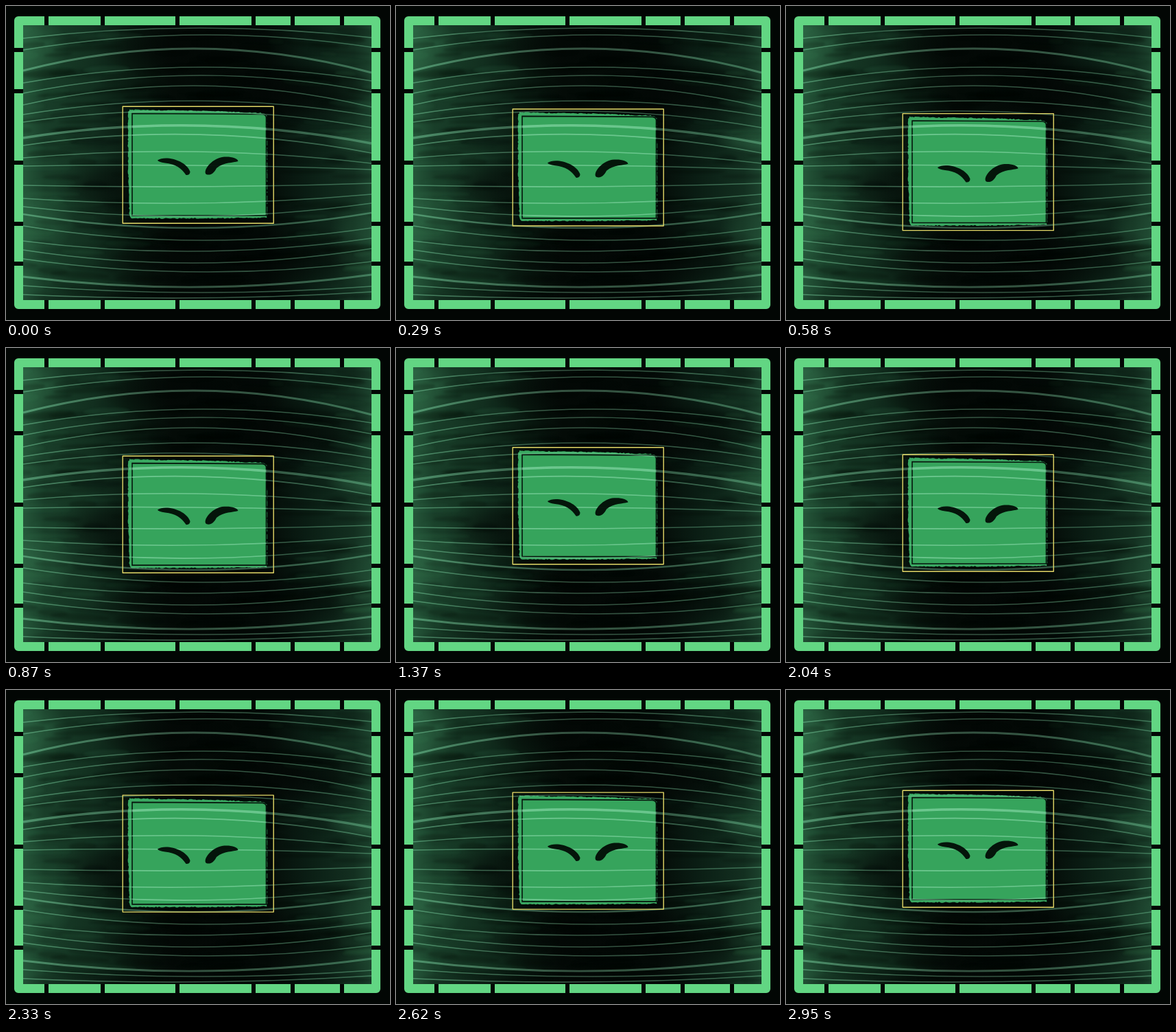
Animation of 560 by 457 pixels, one loop 3000 ms. Source, as an HTML page with a canvas:

```html
<!DOCTYPE html>
<html>
<head>
<meta charset="utf-8">
<style>
html, body { margin: 0; width: 100%; height: 100%; overflow: hidden; background: #020604; }
canvas { display: block; }
</style>
</head>
<body>
<canvas id="stage" width="560" height="457"></canvas>
<script>
const W = 560, H = 457;
const ctx = document.getElementById('stage').getContext('2d');

let seed = 11;
const rnd = () => (seed = (seed * 16807) % 2147483647) / 2147483647;
const between = (a, b) => a + (b - a) * rnd();

function layer(draw) {
  const c = document.createElement('canvas');
  c.width = W; c.height = H;
  draw(c.getContext('2d'));
  return c;
}

function blob(g, x, y, rx, ry, rgb, alpha) {
  g.save();
  g.translate(x, y);
  g.scale(rx, ry);
  const fade = g.createRadialGradient(0, 0, 0, 0, 0, 1);
  fade.addColorStop(0, `rgba(${rgb},${alpha})`);
  fade.addColorStop(0.5, `rgba(${rgb},${alpha * 0.7})`);
  fade.addColorStop(1, `rgba(${rgb},0)`);
  g.fillStyle = fade;
  g.fillRect(-1, -1, 2, 2);
  g.restore();
}

const INK = '2,6,4', MOSS = '58,128,86';

const backdrop = layer(g => {
  g.fillStyle = '#020604';
  g.fillRect(0, 0, W, H);
  g.save();
  g.beginPath();
  g.rect(24, 27, 510, 402);
  g.clip();
  const side = g.createLinearGradient(25, 0, 533, 0);
  [[0, '#25573a'], [.06, '#193e29'], [.2, '#122f1f'], [.3, '#0a1c12'], [.43, '#040b07'],
   [.7, '#040c08'], [.83, '#0b1f15'], [.95, '#132f20'], [1, '#1c422d']]
    .forEach(([p, c]) => side.addColorStop(p, c));
  g.fillStyle = side;
  g.fillRect(0, 0, W, H);
  blob(g, 30, 60, 60, 55, MOSS, .4);
  blob(g, 40, 315, 60, 50, MOSS, .35);
  blob(g, 525, 195, 60, 20, MOSS, .4);
  blob(g, 515, 345, 45, 70, MOSS, .2);
  blob(g, 280, 60, 150, 45, INK, .7);
  blob(g, 410, 125, 140, 50, INK, .8);
  blob(g, 160, 265, 90, 45, INK, .55);
  blob(g, 340, 365, 220, 55, INK, .75);
  blob(g, 280, 430, 290, 28, INK, .7);

  // Streaks of dry paint that follow the bulge of the scan lines
  g.filter = 'blur(1.5px)';
  for (let i = 0; i < 300; i++) {
    const x = between(15, 545), y = between(28, 428);
    const edge = Math.abs(x - 285) / 260;
    const green = rnd() < edge * edge * .62;
    g.fillStyle = `rgba(${green ? MOSS : INK},${between(.04, green ? .13 : .25)})`;
    g.beginPath();
    g.ellipse(x, y, between(12, 50), between(2, 6), (x - 280) * (235 - y) / 480000, 0, 7);
    g.fill();
  }
  g.restore();

  // Segmented border
  g.fillStyle = '#62d683';
  g.beginPath();
  g.roundRect(12, 15, 534, 426, 6);
  g.rect(25, 28, 508, 400);
  g.fill('evenodd');
  g.fillStyle = '#020604';
  for (const x of [56, 138, 247, 358, 415, 487])
    for (const y of [15, 428]) g.fillRect(x, y, 6, 13);
  for (const y of [61, 121, 225, 314, 372])
    for (const x of [12, 533]) g.fillRect(x, y, 13, 6);
});

// Left, middle and right height, then weight
const scans = [
  [47, 32, 46], [64, 42, 60], [94, 62, 97, 3], [112, 89, 109], [127, 101, 125],
  [144, 116, 147], [158, 138, 160], [169, 153, 177], [192, 174, 200, 3.4],
  [203, 187, 214], [221, 212, 229], [233, 232, 238], [261, 263, 258],
  [280, 287, 274], [292, 306, 287], [303, 323, 301, 2.6], [320, 341, 323],
  [342, 357, 338], [355, 374, 353], [368, 387, 372], [394, 409, 391, 2.8],
  [407, 417, 408], [420, 425, 416]
];

const lines = layer(g => {
  const tint = g.createLinearGradient(25, 0, 533, 0);
  tint.addColorStop(0, 'rgba(125,215,165,.48)');
  tint.addColorStop(.45, 'rgba(150,225,180,.34)');
  tint.addColorStop(1, 'rgba(125,215,165,.4)');
  g.strokeStyle = tint;
  for (const [left, mid, right, weight = 1.6] of scans) {
    g.lineWidth = weight;
    g.beginPath();
    g.moveTo(25, left);
    g.quadraticCurveTo(279, 2 * mid - (left + right) / 2, 533, right);
    g.stroke();
  }
});

// Ragged outline through the given corners
function ragged(corners, rough) {
  const path = new Path2D();
  corners.forEach(([x, y], i) => {
    const [u, v] = corners[(i + 1) % corners.length];
    const steps = Math.ceil(Math.hypot(u - x, v - y) / 2.5);
    for (let k = 0; k < steps; k++)
      path.lineTo(x + (u - x) * k / steps + between(-rough, rough),
                  y + (v - y) * k / steps + between(-rough, rough));
  });
  path.closePath();
  return path;
}

// Coordinates relative to the top of the yellow outline
const block = ragged([[180, 5], [184, 5], [300, 7], [376, 10], [380, 14], [380, 162],
                      [300, 163], [182, 163], [180, 158], [178, 90], [178, 8]], .7);
const panel = new Path2D('M184 10.5L300 11L374 11.5Q379.5 12 379.5 17V159H184Z');
const eyes = new Path2D(
  'M221 78.5C232 71 262 78 268.5 95Q268.5 100.5 262.5 100C256 90 247 84 232 82.5Q222 81 221 78.5Z' +
  'M338.5 80C331 82.5 318 81 307 90C303 98 298 101 292 99C286.500 94 299 77 315 74C326 72.500 338 75 338.5 80Z');

function drawBlock(y) {
  ctx.save();
  ctx.translate(0, y);
  ctx.fillStyle = 'rgba(2,6,4,.3)';
  ctx.fillRect(170, 0, 220, 170);
  ctx.fillStyle = '#3aa962';
  ctx.fill(block);
  ctx.fillStyle = '#36a45c';
  ctx.fill(panel);
  ctx.strokeStyle = '#06150c';
  ctx.lineWidth = 1.6;
  ctx.stroke(panel);
  ctx.strokeStyle = '#2c8049';
  ctx.lineWidth = .8;
  ctx.setLineDash([7, 3, 2, 4]);
  ctx.beginPath();
  ctx.moveTo(380.8, 50);
  ctx.lineTo(380.8, 160);
  ctx.stroke();
  ctx.restore();
}

const keys = [[0, 146], [760, 158], [1470, 144], [2020, 155], [3000, 146]];

function topAt(t) {
  const i = keys.findIndex(k => k[0] > t);
  const [t0, y0] = keys[i - 1], [t1, y1] = keys[i];
  return y0 + (y1 - y0) * (1 - Math.cos(Math.PI * (t - t0) / (t1 - t0))) / 2;
}

function render(now) {
  // 24 steps per second, with delays rounded down to 10 ms
  const ms = Math.floor(now % 3000 / 10) * 10;
  const y = topAt(Math.floor((ms + 9.99) * .024) / .024 % 3000);

  ctx.drawImage(backdrop, 0, 0);
  drawBlock(y);
  ctx.drawImage(lines, 0, 0);

  ctx.save();
  ctx.translate(0, y);
  ctx.clip(panel);
  ctx.translate(0, -y);
  ctx.drawImage(lines, 0, 0);
  ctx.restore();

  ctx.save();
  ctx.translate(0, y);
  ctx.fillStyle = 'rgba(2,12,6,.94)';
  ctx.fill(eyes);
  ctx.strokeStyle = '#e6da68';
  ctx.lineWidth = 1.4;
  ctx.lineJoin = 'round';
  ctx.strokeRect(170.2, .2, 220, 170);
  ctx.restore();
}

const start = performance.now();
function tick() {
  render(performance.now() - start);
  requestAnimationFrame(tick);
}
tick();
</script>
</body>
</html>
```
